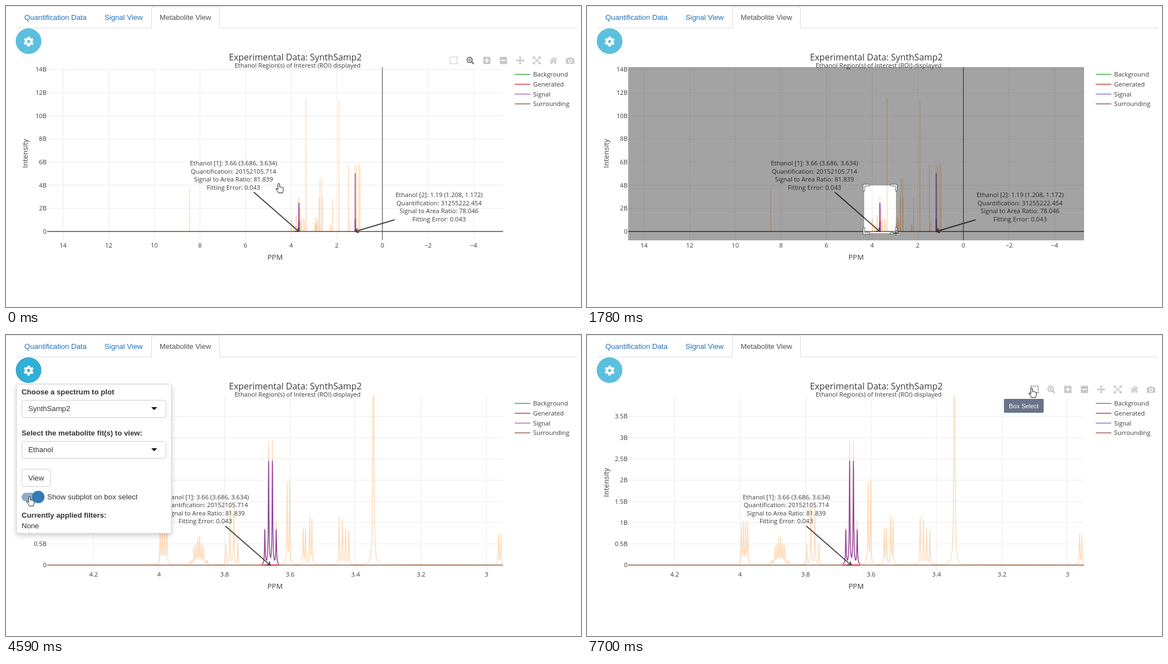
An HTML page that plays this animation: 1033 by 542 pixels, repeating every 8000 ms.

```html
<!DOCTYPE html>
<html lang="en">
<head>
<meta charset="utf-8">
<title>Metabolite View</title>
<style>
html, body { margin: 0; width: 100%; height: 100%; overflow: hidden; background: #fff; }
svg { display: block; width: 100vw; height: 100vh; }
text { font: 13.15px "Liberation Sans", Arial, sans-serif; fill: #333; }
.plot text { font: 11.2px "Open Sans", sans-serif; fill: #3c3c3c; }
.plot .title { font-size: 15.92px; }
.plot .sub { font-size: 11.12px; }
.plot .axis { font-size: 13.07px; }
.mid { text-anchor: middle; }
.end { text-anchor: end; }
.b { font-weight: bold; font-size: 13.2px; }
.link { fill: #1f70b8; }
.line { fill: none; stroke-linejoin: round; }
.grid { stroke: #ebebeb; fill: none; }
.tip { font-size: 11.3px; fill: #fff; }
.plot .hover text { font: 12.1px "Liberation Sans", Arial, sans-serif; fill: #444; }
.box { fill: #fff; stroke: #ccc; }
.ico { fill: #444; opacity: .3; }
.ico .s { fill: none; stroke: #444; }
.ico .w { fill: none; stroke: #fff; stroke-width: 2; }
</style>
</head>
<body>
<svg viewBox="0 0 1033 542" preserveAspectRatio="none">
  <defs>
    <clipPath id="area"><rect x="74" y="110" width="819" height="312"/></clipPath>
    <filter id="shadow" x="-10%" y="-10%" width="120%" height="125%">
      <feDropShadow dx="0" dy="4" stdDeviation="4" flood-opacity=".18"/>
    </filter>
  </defs>

  <path d="M0 .5H1033M18 39.5H261.5V5q0-4 4-4H379.5q4 0 4 4V39.5H1026" fill="none" stroke="#ddd"/>
  <text class="link" x="33" y="25">Quantification Data</text>
  <text class="link" x="177" y="25">Signal View</text>
  <text x="276" y="25" style="fill:#4f4f4f">Metabolite View</text>

  <g class="plot">
    <g id="wide"></g>
    <g id="zoom"></g>
    <text class="title mid" x="519.8" y="98">Experimental Data: SynthSamp2</text>
    <text class="sub mid" x="524" y="111">Ethanol Region(s) of Interest (ROI) displayed</text>
    <text class="axis mid" x="483.5" y="457">PPM</text>
    <text class="axis mid" transform="translate(38.5 265.5) rotate(-90)">Intensity</text>
    <g id="legend"></g>
    <g id="drag">
      <path id="dim" fill-rule="evenodd"/>
      <path id="marks" fill="#fff" stroke="#444" stroke-width=".9"/>
    </g>
    <g id="hover" class="hover">
      <path d="M505 324.5L511 319V307H636V342.500H511V330Z" fill="#ff7f0e" stroke="#444"/>
      <text x="514" y="321.500">PPM: 3.6097</text>
      <text x="514" y="337">Intensity: 1172358240</text>
    </g>
  </g>

  <g id="bar"></g>
  <g id="barTip">
    <rect id="barTipBox" y="115" height="25" rx="2" fill="#69738a"/>
    <text id="barTipText" class="tip mid" y="131.500" style="font-size:11.2px"></text>
  </g>

  <g id="panel">
    <rect x="18.500" y="88.500" width="279" height="268.500" rx="4" fill="#fff" stroke="#ccc" filter="url(#shadow)"/>
    <text class="b" x="28" y="107">Choose a spectrum to plot</text>
    <rect class="box" x="28.500" y="117.500" width="259" height="31" rx="4"/>
    <text x="40" y="137">SynthSamp2</text>
    <path d="M261 130h10.500l-5.250 5.250z"/>
    <text class="b" x="28" y="181">Select the metabolite fit(s) to view:</text>
    <rect class="box" x="28.500" y="191.500" width="259" height="30.500" rx="4"/>
    <text x="40" y="211">Ethanol</text>
    <path d="M261 204h10.500l-5.250 5.250z"/>
    <rect class="box" x="28.500" y="241.500" width="51.500" height="31" rx="4"/>
    <text class="mid" x="54" y="262">View</text>
    <rect id="track" x="28" y="284" width="38" height="15.500" rx="7.700"/>
    <circle id="knob" cy="291.700" r="11.200"/>
    <text x="74" y="296" style="font-size:13.35px">Show subplot on box select</text>
    <text class="b" x="28" y="328.500">Currently applied filters:</text>
    <text x="28" y="347.500">None</text>
  </g>

  <circle id="btn" cx="40.500" cy="63.300" r="22.500"/>
  <g fill="none" stroke="#fff" transform="translate(40.7 64) rotate(-90)">
    <circle r="5" stroke-width="4.200"/>
    <circle r="7.600" stroke-width="3" stroke-dasharray="4.2 3.759" stroke-dashoffset="2.100"/>
  </g>
  <g id="btnTip">
    <path d="M66 63l5-4.500V56q0-4 4-4h70q4 0 4 4V69.500q0 4-4 4H75q-4 0-4-4V67.500z"/>
    <text class="tip mid" x="110" y="66.500" style="font-size:11.4px">Plot Options</text>
  </g>

  <g id="cursor">
    <g id="cross" fill="none">
      <path d="M-6.500 0H6.500M0-6.500V6.500" stroke="#fff" stroke-width="3"/>
      <path d="M-6 0H6M0-6V6" stroke="#111" stroke-width="1.300"/>
    </g>
    <path id="arrow" d="M0 0V13l3-2.800 2 4.600 2-.9-2-4.500h4.200z" stroke="#fff" stroke-width=".8"/>
    <path id="hand" fill="#fff" stroke="#111" stroke-linejoin="round"
      d="M-1.600 1.200a1.600 1.600 0 0 1 3.200 0V6q1.300-.9 2.400.3q1.500-.7 2.300.5q1.900-.3 1.900 1.600v3.200q0 2-1.300 3.400v1.600h-7.300q-.4-1.600-1.800-3l-2.800-3.600q-.6-1.600 1-1.600q1.200.2 2.400 2z"/>
  </g>
</svg>

<script>
const $ = id => document.getElementById(id);
const set = (id, attrs) => { for (const k in attrs) $(id).setAttribute(k, attrs[k]); };
const show = (id, on) => { $(id).style.display = on ? '' : 'none'; };
const text = (x, y, s, cls = '') => `<text x="${x}" y="${y}" class="${cls}">${s}</text>`;

// Spectra: evenly spaced groups of Lorentzian peaks [ppm, height in billions]
const group = (ppm, step, heights) => heights.map((h, i) => [ppm - i * step, h]);
const HALF = 0.0011;
const OFFSETS = [0, .3, .7, 1.2, 2, 3, 5, 9, 20];

const sample = [
  ...group(8.447, 0, [3.8]),
  ...group(3.9957, .0065, [.95, .97, .97, .98]),
  ...group(3.9048, .0058, [.1, .1, .41, .45, .6, .63, .46, .43, .1, .1]),
  ...group(3.796, .0122, [.48, 1.4, 1.38, .5]),
  ...group(3.677, .0116, [.85, 2.86, 2.89, 1]),
  ...group(3.609, .0077, [1.9, 1.95]),
  ...group(3.5597, .0068, [.84, .84]),
  ...group(3.5401, .0068, [1.12, 1.06]),
  ...group(3.45, .0099, [1.12, 1.05, .82, .8]),
  ...group(3.3455, 0, [11.5]),
  ...group(2.963, .007, [.71, .71]),
  ...group(2.93, .03, [1.2, .6, 1.2, .9]),
  ...group(2.775, 0, [2.9]),
  ...group(2.738, .073, [4.55, 4.55]),
  ...group(2.64, 0, [2.9]),
  ...group(2.28, .03, [.6, .5]),
  ...group(2.18, 0, [2.85]),
  ...group(1.908, 0, [11.25]),
  ...group(1.49, .06, [5.7, .9]),
  ...group(1.2, .07, [5.7, 5.7]),
  ...group(1.03, .05, [5.9, 5.7])
];
const fits = [
  { hi: 3.686, lo: 3.634, peaks: group(3.677, .0116, [.81, 2.42, 2.42, .81]) },
  { hi: 1.208, lo: 1.172, peaks: group(1.202, .012, [1, 5, 1]) }
];

function curve(peaks, hi, lo, X, Y) {
  const at = p => peaks.reduce((sum, [c, h]) => sum + h / (1 + ((p - c) / HALF) ** 2), 0);
  const ps = [hi, lo];
  for (const [c] of peaks)
    for (const o of OFFSETS) ps.push(c - o * HALF, c + o * HALF);
  return 'M' + ps.filter(p => p <= hi && p >= lo).sort((a, b) => b - a)
    .map(p => X(p).toFixed(2) + ' ' + Y(at(p)).toFixed(2)).join('L');
}

function note(x, y, lines, [x1, y1, x2, y2]) {
  const angle = Math.atan2(y2 - y1, x2 - x1) * 180 / Math.PI;
  return lines.map((s, i) => text(x, y + i * 14.65, s, 'mid')).join('') +
    `<g fill="none" stroke="#444" stroke-width="1.9"><path d="M${x1} ${y1}L${x2} ${y2}"/>
     <path d="M-5.5 -4L0 0L-5.500 4" transform="translate(${x2} ${y2}) rotate(${angle})"/></g>`;
}

function chart(id, v) {
  const X = p => v.x0 - v.kx * p, Y = h => v.y0 - v.ky * h;
  const stroke = (d, c, w, o = 1) =>
    `<path class="line" d="${d}" stroke="${c}" stroke-width="${w}" opacity="${o}"/>`;
  let grid = '', labels = '';
  for (const p of v.xs) {
    grid += `M${X(p)} 110V422`;
    labels += text(X(p), 434.5, String(p).replace('-', '\u2212'), 'mid');
  }
  for (const h of v.ys) {
    grid += `M74 ${Y(h)}H893`;
    labels += text(73, Y(h) + 4, h ? h + 'B' : '0', 'end');
  }
  $(id).innerHTML = `<g clip-path="url(#area)"><path class="grid" d="${grid}"/>` +
    stroke(`M${X(0)} 110V422`, '#444', 1.1) +
    stroke(curve(sample, 15, -6, X, Y), '#ff7f0e', v.w, v.alpha) +
    stroke(`M74 ${v.y0}H893`, '#6b483f', 1.3) +
    fits.map(f =>
      stroke(`M${X(f.hi)} ${v.y0}H${X(f.lo)}`, '#e8222a', 2) +
      stroke(curve(f.peaks, f.hi, f.lo, X, Y), '#93409f', 1.5)).join('') +
    '</g>' + labels + v.notes.map(n => note(...n)).join('');
}

const range = (a, step, n) => Array.from({ length: n }, (_, i) => +(a + i * step).toFixed(1));
const ethanol1 = ['Ethanol [1]: 3.66 (3.686, 3.634)', 'Quantification: 20152105.714',
  'Signal to Area Ratio: 81.839', 'Fitting Error: 0.043'];
const ethanol2 = ['Ethanol [2]: 1.19 (1.208, 1.172)', 'Quantification: 31255222.454',
  'Signal to Area Ratio: 78.046', 'Fitting Error: 0.043'];

chart('wide', {
  x0: 676.2, kx: 40.98, y0: 406, ky: 20.83, w: 1.1, alpha: .36,
  xs: range(14, -2, 10), ys: range(0, 2, 8),
  notes: [[408.7, 287, ethanol1, [445, 335, 526, 406]],
          [778, 344, ethanol2, [698, 385, 627.5, 406]]]
});
chart('zoom', {
  x0: 2627.8, kx: 588.2, y0: 414.4, ky: 76.55, w: 1.4, alpha: .3,
  xs: range(4.2, -.2, 7), ys: range(0, .5, 8),
  notes: [[358, 295.5, ethanol1, [394, 344, 474.5, 414.4]]]
});

$('legend').innerHTML = [['Background', '#2ca02c'], ['Generated', '#d62728'],
  ['Signal', '#9467bd'], ['Surrounding', '#8c564b']].map(([s, c], i) => {
    const y = 123.2 + i * 17.7;
    return `<path d="M914 ${y}h28" stroke="${c}" stroke-width="1.4"/>` + text(947, y + 4, s);
  }).join('');

const square = '<rect x="-6.5" y="-6.5" width="13" height="13" rx="1"/>';
const head = a => `<path d="M0 -7.5l3 3.300h-6z" transform="rotate(${a})"/>`;
const corner = a => `<path d="M-7 -7h5l-5 5z" transform="rotate(${a})"/>`;
const turns = f => [0, 90, 180, 270].map(f).join('');
$('bar').innerHTML = [
  '<rect class="s" x="-6.5" y="-6" width="13" height="12" stroke-width="2" stroke-dasharray="2 1.850"/>',
  '<circle class="s" cx="-1" cy="-1" r="4.6" stroke-width="2.2"/><path class="s" d="M2.500 2.500L6.300 6.300" stroke-width="2.800"/><path class="s" d="M-3.500 -1h5M-1 -3.500v5" stroke-width="1.500"/>',
  square + '<path class="w" d="M-4 0h8M0 -4v8"/>',
  square + '<path class="w" d="M-4 0h8"/>',
  '<path class="s" d="M-5 0H5M0 -5V5" stroke-width="1.8"/>' + turns(head),
  '<path class="s" d="M-5 -5L5 5M5 -5L-5 5" stroke-width="1.5"/>' + turns(corner),
  '<path d="M-7 .5L0 -6L3 -3.200V-5.500H5V-1.400L7 .5L6 1.500L0 -4L-6 1.500zM-5 2L0 -2.600L5 2V6H1.500V2.500H-1.500V6H-5z"/>',
  '<path d="M-7.500 -3.500h4l1.500-2h4l1.500 2h4v9.500h-15z"/><circle class="w" cy="1" r="2.800" style="stroke-width:1.6"/>'
].map((s, i) => `<g class="ico" transform="translate(${804 + i * 29.9} 98)">${s}</g>`).join('');
const icons = $('bar').children;

// Pointer path: [tick, x, y, shape]
const path = [
  [0, 490, 320, 'hand'], [1, 498, 323, 'cross'], [4, 498, 323, 'cross'],
  [5, 503, 353, 'cross'], [12, 555, 409, 'cross'], [16, 555, 409, 'cross'],
  [18, 470, 420, 'cross'], [20, 160, 300, 'cross'], [21, 14, 190, 'arrow'],
  [22, 22, 112, 'arrow'], [23, 53, 70, 'hand'], [26, 54, 72, 'hand'],
  [27, 60, 120, 'arrow'], [29, 50, 275, 'arrow'], [30, 43, 291, 'hand'],
  [33, 41, 292, 'hand'], [36, 41, 292, 'hand'], [37, 48, 288, 'hand'],
  [38, 120, 268, 'arrow'], [40, 440, 202, 'cross'], [41, 621, 168, 'cross'],
  [42, 740, 132, 'cross'], [43, 805, 112, 'arrow'], [44, 832, 98, 'hand'],
  [46, 832, 95, 'hand'], [48, 802, 95, 'hand'], [50, 799, 96, 'hand'], [54, 799, 96, 'hand']
];
function pointer(n) {
  let i = 0;
  while (i < path.length - 2 && path[i + 1][0] <= n) i++;
  const [n0, x0, y0, shape] = path[i], [n1, x1, y1] = path[i + 1];
  const f = (n - n0) / (n1 - n0);
  return { x: x0 + (x1 - x0) * f, y: y0 + (y1 - y0) * f, shape };
}

// Value of the last [tick, value] entry reached
const hold = (n, steps) => steps.reduce((v, [at, to]) => n >= at ? to : v, 0);

function dragBox(n, { x, y }) {
  const l0 = 498, t = 323, strip = x - l0 < 20;
  const b = n === 5 ? 342.5 : y, l = strip ? 74 : l0, r = strip ? 893 : x;
  set('dim', { d: `M74 110H893V422H74ZM${l} ${t}H${r}V${b}H${l}Z`, 'fill-opacity': n === 5 ? .19 : .36 });
  const c = 10;
  const ell = (x, y, sx, sy) =>
    `M${x - sx * 2} ${y + sy * c}h${sx * 3}v${-sy * (c - 1)}h${sx * (c - 1)}v${-sy * 3}h${-sx * (c + 2)}z`;
  set('marks', { d: strip
    ? `M479 ${t - .5}h38.500v-3h-38.500zM479 ${b + .5}h38.500v3h-38.500z`
    : ell(l, t, 1, 1) + ell(r, t, -1, 1) + ell(l, b, 1, -1) + ell(r, b, -1, -1) });
}

const LOOP = 8000, TICK = LOOP / 54;
let last = -1;

function draw(n) {
  const p = pointer(n);
  set('cursor', { transform: `translate(${p.x.toFixed(1)} ${p.y.toFixed(1)})` });
  for (const s of ['cross', 'arrow', 'hand']) show(s, s === p.shape);

  const zoomed = n >= 14;
  show('wide', !zoomed);
  show('zoom', zoomed);
  show('hover', zoomed && n < 18);
  show('drag', n >= 5 && !zoomed);
  if (n >= 5 && !zoomed) dragBox(n, p);

  $('bar').style.opacity = hold(n, [[0, 1], [5, .3], [6, 0], [14, .12], [15, 1], [20, .4], [21, 0], [41, .12], [42, 1]]);
  icons[0].style.opacity = n >= 48 ? .7 : .3;
  icons[1].style.opacity = n < 52 ? .7 : .3;

  const select = n >= 48;
  const right = select ? 820.5 : 851, width = select ? 71.5 : 49;
  show('barTip', n >= 45 && n !== 47);
  set('barTipBox', { x: right - width, width });
  set('barTipText', { x: right - width / 2 });
  $('barTipText').textContent = select ? 'Box Select' : 'Zoom';

  const hot = n >= 23 && n < 52;
  set('btn', { fill: hot ? '#31b0d5' : '#5bc0de', stroke: hot ? '#269abc' : '#46b8da' });
  $('btnTip').style.opacity = hold(n, [[23, .36], [24, .9], [27, .3], [28, 0]]);

  show('panel', n >= 25 && n < 52);
  const on = n >= 31;
  set('track', { fill: on ? '#8eaecd' : '#b5b5b5' });
  set('knob', { cx: hold(n, [[0, 38], [30, 46], [31, 58]]), fill: on ? '#337ab7' : '#f5f5f5', stroke: on ? 'none' : '#ccc' });
}

function frame(now) {
  const n = Math.floor((now % LOOP + 8) / TICK) % 54;
  if (n !== last) draw(last = n);
  requestAnimationFrame(frame);
}
draw(last = 0);
let start;
requestAnimationFrame(function begin(now) {
  start = now;
  const run = t => { frameAt(t - start); requestAnimationFrame(run); };
  const frameAt = t => {
    const n = Math.floor((t % LOOP + 8) / TICK) % 54;
    if (n !== last) draw(last = n);
  };
  run(now);
});
</script>
</body>
</html>
```
